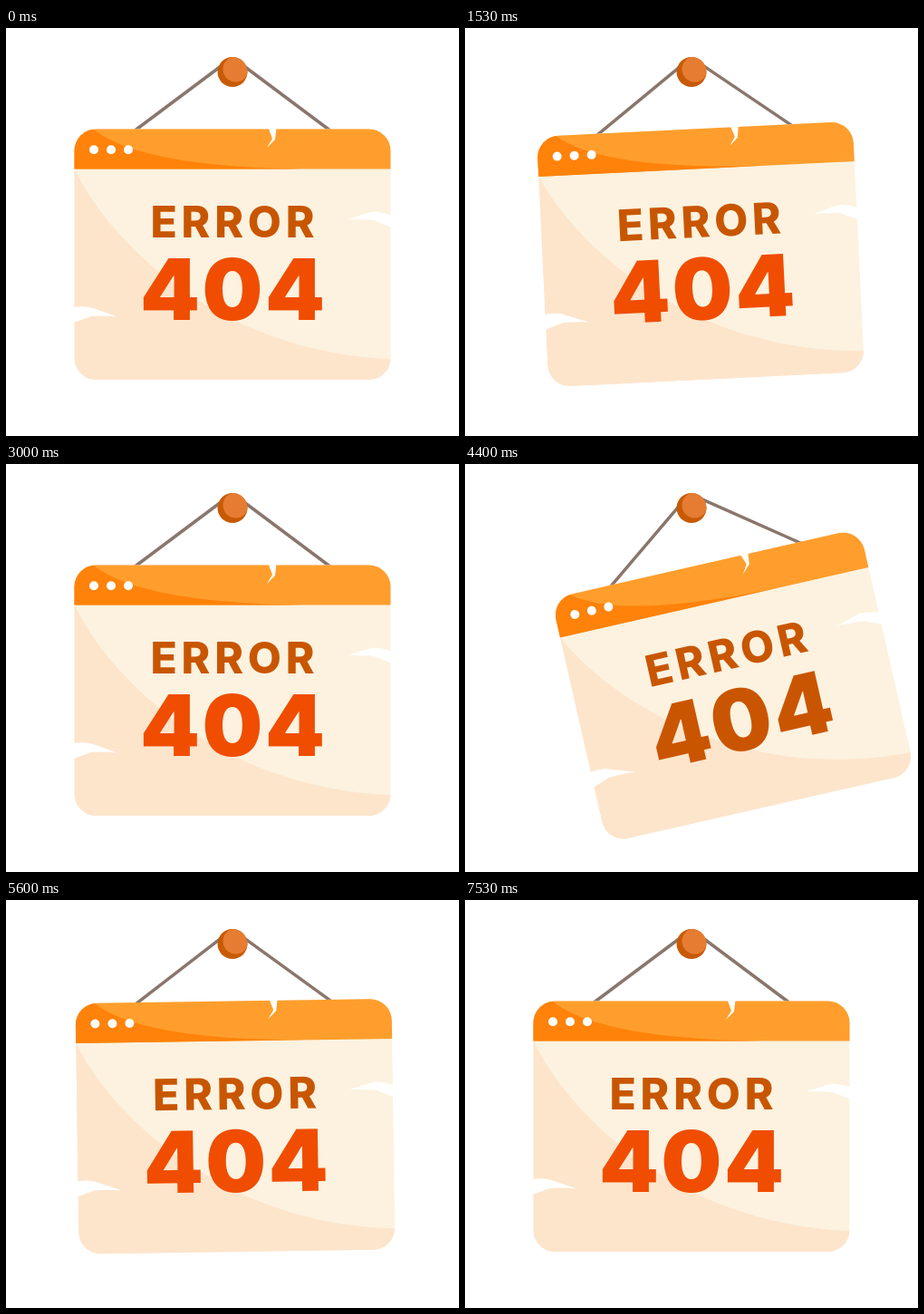
Animation, 500 px wide and 450 px high, one loop 8.01 s. Source, as an HTML page with a canvas:

```html
<!DOCTYPE html>
<html lang="en">
<head>
<meta charset="utf-8">
<title>Error 404</title>
<style>
html, body { margin: 0; width: 100%; height: 100%; overflow: hidden; background: #fff; }
canvas { display: block; }
</style>
</head>
<body>
<canvas id="stage" width="500" height="450"></canvas>
<script>
const ctx = document.getElementById('stage').getContext('2d');
const LOOP = 8010;
const CYCLE = 4000;
const PIVOT = { x: 250, y: 42 };
const FONT = 'Inter, "Open Sans", sans-serif';

// Damped swing: [time in ms, degrees], positive swings to the right.
const SWING = [[0, 0], [333, 14], [833, -10], [1333, 8], [1833, -5], [2333, 3], [3000, 0]];

const smooth = p => p * p * (3 - 2 * p);

function swingAngle(ms) {
  for (let i = 1; i < SWING.length; i++) {
    const [t0, a0] = SWING[i - 1];
    const [t1, a1] = SWING[i];
    if (ms < t1) return a0 + (a1 - a0) * smooth((ms - t0) / (t1 - t0));
  }
  return 0;
}

// Poses are 50 ms apart but shown in alternating 30 and 70 ms holds.
function poseTime(ms) {
  const base = Math.floor(ms / 100) * 100;
  return base + (ms - base >= 30 ? 50 : 0);
}

function disc(x, y, r, color) {
  ctx.fillStyle = color;
  ctx.beginPath();
  ctx.arc(x, y, r, 0, Math.PI * 2);
  ctx.fill();
}

function shape(d, color) {
  ctx.fillStyle = color;
  ctx.fill(new Path2D(d));
}

function label(text, y, size, weight, spacing, color) {
  ctx.font = `${weight} ${size}px ${FONT}`;
  ctx.letterSpacing = spacing + 'px';
  ctx.textAlign = 'center';
  ctx.fillStyle = color;
  ctx.fillText(text, 250 + spacing / 2, y);
}

function drawRope() {
  ctx.strokeStyle = '#8a766c';
  ctx.lineWidth = 3.5;
  ctx.stroke(new Path2D('M141 114 L238 41.5 Q250 33 262 41.5 L359 114'));
}

function drawPanel(digits) {
  ctx.save();
  ctx.beginPath();
  ctx.roundRect(75.5, 111.5, 349, 276.5, 24);
  ctx.clip();
  shape('M70 100 H430 V400 H70 Z', '#fcf2df');
  shape('M70 150 L77 158 C112 231 230 357 424 365 H430 V400 H70 Z', '#fde5cc');
  shape('M70 100 H430 V155.5 H70 Z', '#ff9e2c');
  shape('M70 100 H90 L97 112 C135 142 220 154 328 155.5 H70 Z', '#ff820a');
  ctx.restore();

  for (const x of [97, 116, 135]) disc(x, 134.3, 5, '#fff');

  shape('M289.5 110 L294 122 L288 132 L297 123 L298.5 110 Z', '#fff');
  shape('M426 207 Q412 202 403 203 L377 211 Q396 211 406 212 L426 220 Z', '#fff');
  shape('M74 308 Q88 306 96 309 L123 318.5 Q106 317 94 318 L74 325 Z', '#fff');

  label('ERROR', 231, 48, 800, 4.8, '#c85600');
  label('404', 322, 94, 900, 2.5, digits);
}

function drawPin() {
  disc(250, 48.5, 16.5, '#c85a05');
  ctx.save();
  ctx.beginPath();
  ctx.arc(250, 48.5, 16.5, 0, Math.PI * 2);
  ctx.clip();
  disc(253.5, 45.5, 14, '#e67c32');
  ctx.restore();
}

function draw(now) {
  const angle = swingAngle(poseTime(now % LOOP) % CYCLE);
  ctx.fillStyle = '#fff';
  ctx.fillRect(0, 0, 500, 450);
  ctx.save();
  ctx.translate(PIVOT.x, PIVOT.y);
  ctx.rotate(-angle * Math.PI / 180);
  ctx.translate(-PIVOT.x, -PIVOT.y);
  drawRope();
  drawPanel(angle > 12 ? '#ca5500' : '#f04d00');
  ctx.restore();
  drawPin();
}

let start;
function tick(now) {
  start ??= now;
  draw(now - start);
  requestAnimationFrame(tick);
}
draw(0);
requestAnimationFrame(tick);
</script>
</body>
</html>
```
